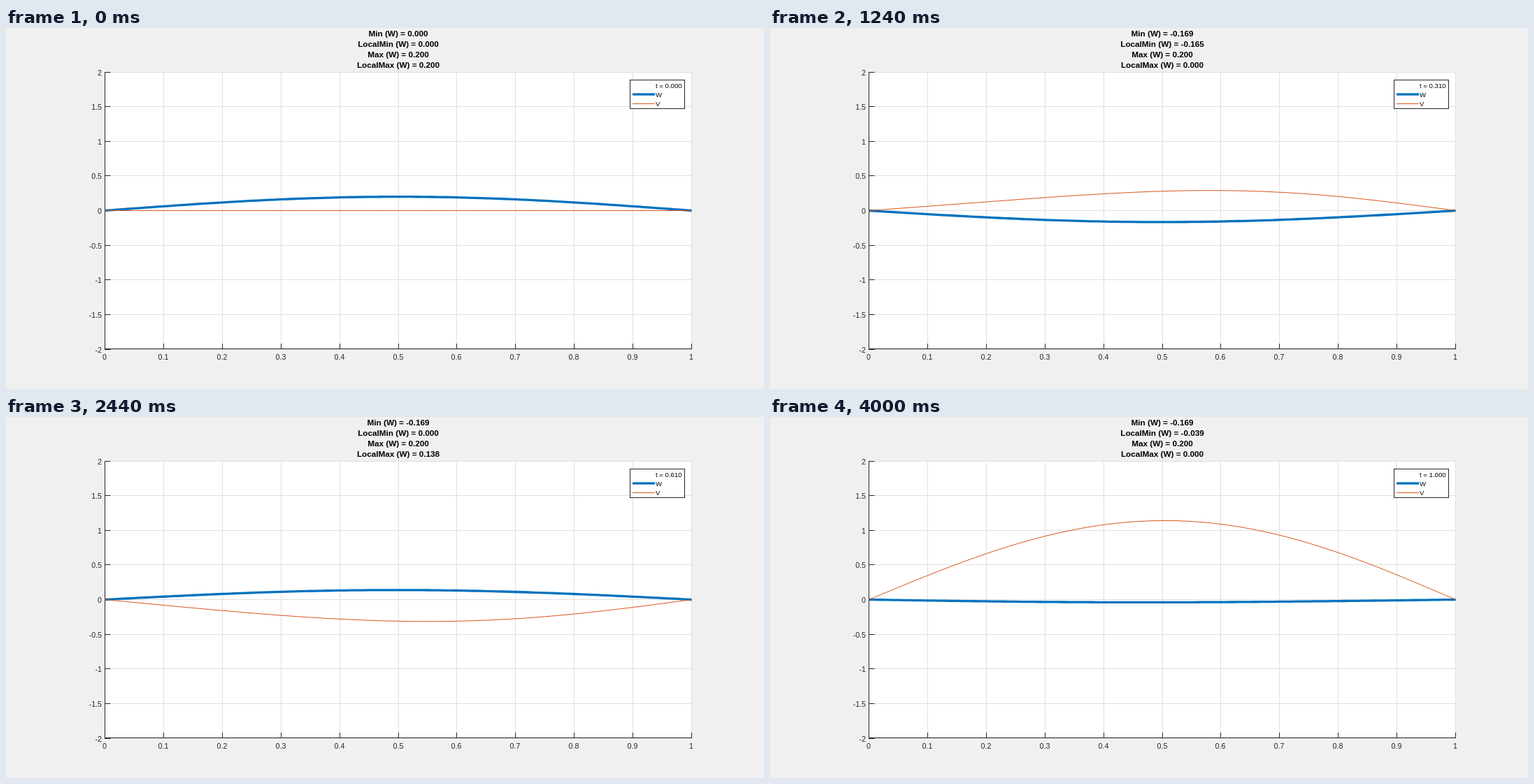
An HTML page that plays this animation: 1084x517 px, repeating every 4.04 s.

```html
<!DOCTYPE html>
<html lang="en">
<head>
<meta charset="utf-8">
<title>Damped vibration</title>
<style>
  html, body { margin: 0; width: 100%; height: 100%; overflow: hidden; background: #f0f0f0; }
  svg { display: block; width: 1084px; height: 517px; font-family: "Liberation Sans", Arial, sans-serif; }
  path, line { fill: none; }
  .grid { stroke: #dfdfdf; }
  .axis { stroke: #262626; }
  .tick { font-size: 10.67px; fill: #262626; }
  .title { font-size: 11.73px; font-weight: bold; text-anchor: middle; }
  .key { font-size: 9.6px; }
  .w { stroke: #0072bd; stroke-width: 3.3; stroke-linejoin: round; }
  .v { stroke: #d95319; stroke-width: 1; stroke-linejoin: round; }
</style>
</head>
<body>
<svg viewBox="0 0 1084 517">
  <rect x="141" y="63" width="840" height="397" fill="#fff"/>
  <g id="axes"></g>
  <path id="w" class="w"/>
  <path id="v" class="v"/>
  <g id="titles"></g>
  <rect x="892.5" y="74.5" width="78" height="41" fill="#fff" class="axis"/>
  <line x1="896" y1="95" x2="928" y2="95" class="w"/>
  <line x1="896" y1="108.5" x2="928" y2="108.5" class="v"/>
  <text id="time" class="key" x="929" y="86"></text>
  <text class="key" x="929" y="98.5">W</text>
  <text class="key" x="929" y="111.5">V</text>
</svg>
<script>
const $ = id => document.getElementById(id);
const LEFT = 141.5, TOP = 63.5, BOTTOM = 460.5, WIDTH = 839, ZERO = 261.5, UNIT = 99.25;
const FRAME_MS = 40, FRAMES = 101, POINTS = 100;

function add(parent, tag, attrs, text = '') {
  const el = document.createElementNS('http://www.w3.org/2000/svg', tag);
  for (const name in attrs) el.setAttribute(name, attrs[name]);
  el.textContent = text;
  return parent.appendChild(el);
}

function drawAxes() {
  const axes = $('axes');
  const path = (cls, d) => add(axes, 'path', { class: cls, d });
  let grid = '', ticks = `M${LEFT} ${TOP}V${BOTTOM - 0.5}M${LEFT - 0.5} ${BOTTOM - 1}H981`;
  const label = (x, y, anchor, text) =>
    add(axes, 'text', { class: 'tick', x, y, 'text-anchor': anchor }, text);
  for (let i = 0; i <= 10; i++) {
    const x = Math.floor(LEFT + i * WIDTH / 10) + 0.5;
    grid += `M${x} ${TOP}V${BOTTOM}`;
    ticks += `M${x} 460V452`;
    label(x - 0.5, 475, 'middle', String(i / 10));
  }
  for (let i = 0; i <= 8; i++) {
    const y = Math.floor(63 + i * 49.625) + 0.5;
    grid += `M${LEFT} ${y}H981`;
    ticks += `M141 ${y}H149.5`;
    label(137, y + 4, 'end', String(2 - i / 2));
  }
  path('grid', grid);
  path('axis', ticks);
}

// Two modes: a decaying fundamental and a small second mode it drives.
const FREQ = 10.64, FREQ2 = 40, DECAY2 = 5, COUPLING = 0.00173;
function modes(t) {
  const w1 = 0.2 * Math.exp(-0.575 * t) * Math.cos(FREQ * t);
  const v1 = -0.2 * FREQ * Math.exp(-0.56 * t) * Math.sin(FREQ * t);
  const kick = 0.2 * COUPLING * FREQ ** 2 * Math.exp(-DECAY2 * t);
  return {
    w: [w1, -COUPLING * v1 - kick / FREQ2 * Math.sin(FREQ2 * t)],
    v: [v1, COUPLING * FREQ ** 2 * w1 - kick * Math.cos(FREQ2 * t)]
  };
}

function sample([a, b]) {
  return Array.from({ length: POINTS + 1 }, (_, i) => {
    const angle = Math.PI * i / POINTS;
    return i % POINTS ? a * Math.sin(angle) + b * Math.sin(2 * angle) : 0;
  });
}

const toPath = values => 'M' + values.map((value, i) =>
  `${(LEFT + i * WIDTH / POINTS).toFixed(2)} ${(ZERO - value * UNIT).toFixed(2)}`).join('L');

let min = 0, max = 0;
const states = Array.from({ length: FRAMES }, (_, i) => {
  const t = i / 100, { w, v } = modes(t);
  const values = sample(w);
  const low = Math.min(...values), high = Math.max(...values);
  min = Math.min(min, low);
  max = Math.max(max, high);
  return { t, w: toPath(values), v: toPath(sample(v)), stats: [min, low, max, high] };
});

drawAxes();
const names = ['Min', 'LocalMin', 'Max', 'LocalMax'];
const titles = names.map((_, i) => add($('titles'), 'text', { class: 'title', x: 561, y: 12 + 15 * i }));

let shown = -1;
function render(now) {
  const index = Math.floor(now / FRAME_MS) % FRAMES;
  if (index !== shown) {
    shown = index;
    const state = states[index];
    $('w').setAttribute('d', state.w);
    $('v').setAttribute('d', state.v);
    $('time').textContent = `t = ${state.t.toFixed(3)}`;
    titles.forEach((title, i) => {
      title.textContent = `${names[i]} (W) = ${state.stats[i].toFixed(3)}`;
    });
  }
  requestAnimationFrame(render);
}
render(performance.now());
</script>
</body>
</html>
```
